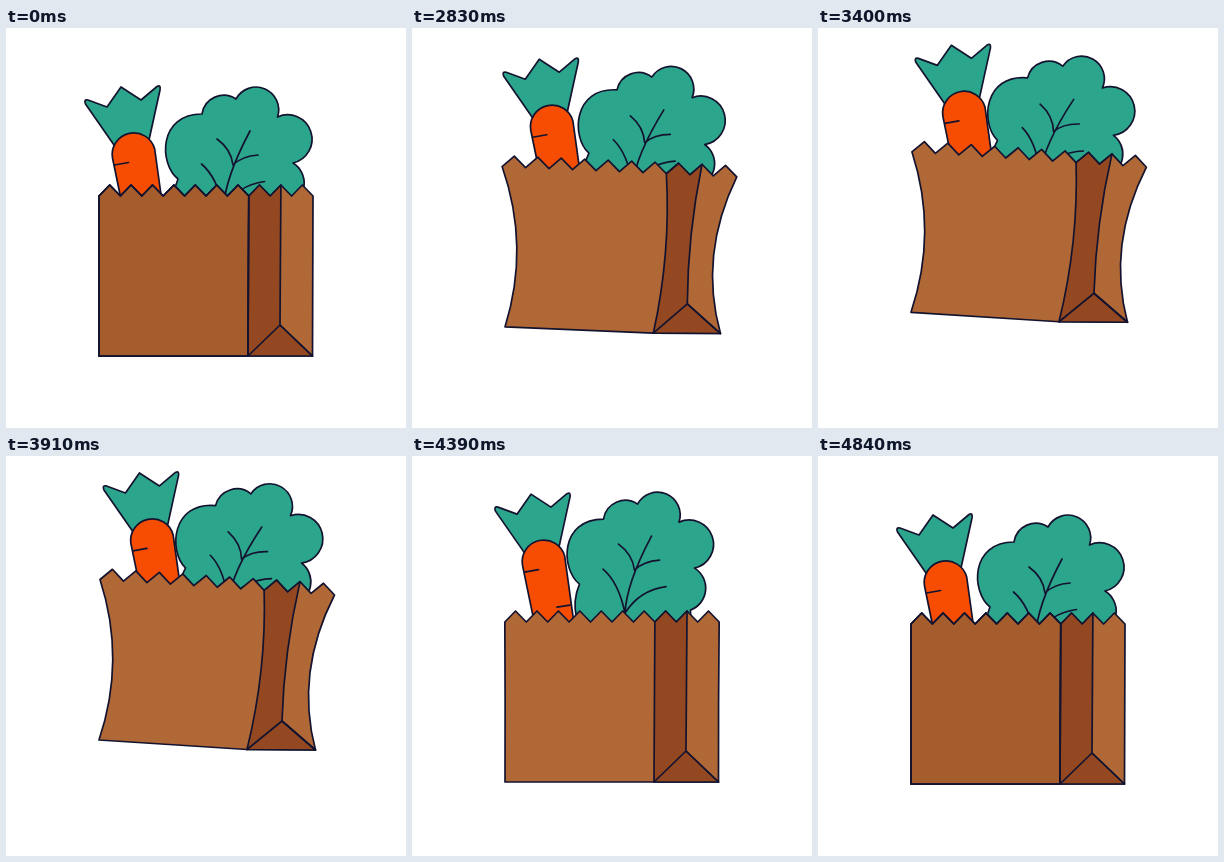
These frames come from a looping animation (400 by 400 pixels, 4.87 s). An HTML page:

```html
<!DOCTYPE html>
<html lang="en">
<head>
<meta charset="utf-8">
<title>Grocery bag</title>
<style>
  html, body { margin: 0; width: 100%; height: 100%; overflow: hidden; background: #fff; }
  svg { display: block; width: 100vw; height: 100vh; }
  .line { fill: none; }
  .leaf { fill: #2ca58d; }
  .root { fill: #f74d02; }
  .dark { fill: #944821; }
</style>
</head>
<body>
<svg viewBox="0 0 400 400" stroke="#13132f" stroke-width="1.7" stroke-linejoin="round" stroke-linecap="round">
  <g id="broccoli">
    <path class="leaf" d="M172 151C153 136 152 86 196 86A22 22 0 0 1 230 71A22.7 22.7 0 0 1 271.5 89A24.4 24.4 0 1 1 287 135A23.5 23.5 0 0 1 283 177V215H172L169 185Q165 167 172 151Z"/>
    <path class="line" d="M217.5 180Q219 150 244 103M211 111Q225 121 227 137Q236 128 252 127M195.5 136Q211 149 217.5 180Q232 157 258.5 153.5"/>
  </g>
  <g id="carrot">
    <path class="leaf" d="M108 117L79.5 76Q77.5 71 82 72L101 79L115 59L135 72L151 58.5Q155 56.500 154 62L143 112Z"/>
    <path class="root" d="M106.5 130A21.6 21.6 0 0 1 148.7 121L161 210H123Z"/>
    <path class="line" d="M108.500 137L122.500 134.500M141 172L154 170"/>
  </g>
  <path id="body"/>
  <path id="side" class="dark"/>
  <path id="folds" class="line"/>
</svg>
<script>
const LOOP = 4870, START = 2530, END = 4840;
const $ = id => document.getElementById(id);
const mix = (a, b, k) => a + (b - a) * k;

// Monotone cubic through [time, value] pairs.
function track(keys) {
  const n = keys.length;
  const slope = i => (keys[i + 1][1] - keys[i][1]) / (keys[i + 1][0] - keys[i][0]);
  const tangent = keys.map((k, i) => {
    if (i === 0 || i === n - 1) return 0;
    const a = slope(i - 1), b = slope(i);
    return a * b > 0 ? 2 * a * b / (a + b) : 0;
  });
  return t => {
    if (t <= keys[0][0]) return keys[0][1];
    if (t >= keys[n - 1][0]) return keys[n - 1][1];
    let i = 0;
    while (t > keys[i + 1][0]) i++;
    const [t0, v0] = keys[i], [t1, v1] = keys[i + 1];
    const d = t1 - t0, x = (t - t0) / d, y = 1 - x;
    return v0 * (1 + 2 * x) * y * y + v1 * x * x * (3 - 2 * x)
      + d * x * y * (tangent[i] * y - tangent[i + 1] * x);
  };
}

const rise = [[2520, 0], [2830, 0.66], [3070, 0.945], [3320, 0.99], [3900, 1]];
const along = (peak, ...rest) => track([...rise.map(([t, v]) => [t, v * peak]), ...rest]);

const lift = along(1, [4110, 1], [4200, 0.7], [4285, 0]);
const bend = track([[2500, 0], [2530, 0.16], [2830, 1], [4060, 1], [4190, 0], [4290, -1.3], [4380, 0], [4450, 0.06], [4600, 0]]);
const hop = track([[4290, 0], [4390, 2], [4640, 0]]);

const carrotX = along(18.5, [4130, 9], [4390, 4], [4520, 0]);
const carrotY = along(-42, [4130, -49], [4390, -21], [4520, 3], [4680, 0]);
const broccoliX = along(10.500, [4130, 4], [4390, -4.5], [4540, 0]);
const broccoliY = along(-33, [4130, -42], [4390, -23], [4520, 3], [4680, 0]);
const broccoliTurn = along(5.5, [4130, 3], [4340, 0]);

const str = p => p[0].toFixed(2) + " " + p[1].toFixed(2);
const poly = pts => pts.map(str).join("L");

// Curve to b whose control point sits sideways of the middle of a-b.
const bow = (a, b, off) => "Q" + str([(a[0] + b[0]) / 2 + off, (a[1] + b[1]) / 2]) + " " + str(b);

function drawBag(u, b, up, resting) {
  const flare = 10.5 * Math.max(b, 0), squash = 7 * Math.max(-b, 0);
  const at = (x, y, dx, dy) => [x + dx * u, y + dy * u - up];
  const tl = at(93 - flare, 168 + squash, 11.5, -44.5);
  const tr = at(307 + flare, 168 + squash, 11, -29);
  const bl = at(93, 328, 0, -44);
  const bm = at(242, 328, -1, -34.5);
  const br = at(306.5, 328, 3, -34);
  const apex = at(274, 297, 2, -32);
  const lean = (tr[1] - tl[1]) / (tr[0] - tl[0]);

  // Even steps are valleys, odd steps are peaks.
  const tooth = i => {
    const h = i % 2 ? 11 : 0;
    return [mix(tl[0], tr[0], i / 20) + h * lean, mix(tl[1], tr[1], i / 20) - h];
  };
  const teeth = (from, to) => Array.from({ length: to - from + 1 }, (_, i) => tooth(from + i));
  const corner = tooth(14), ridge = tooth(17);

  $("body").setAttribute("d", "M" + poly(teeth(0, 20)) + bow(tr, br, -30 * b)
    + "L" + poly([bm, bl]) + bow(bl, tl, 26.5 * b) + "Z");
  $("body").setAttribute("fill", "#b06836");
  $("side").setAttribute("d", "M" + poly(teeth(14, 17)) + bow(ridge, apex, -7 * b)
    + "L" + poly([br, bm]) + bow(bm, corner, 11 * b) + "Z");
  $("folds").setAttribute("d", "M" + poly([bm, apex, br])
    + (resting ? "M" + poly(teeth(0, 14)) + "L" + poly([bm, bl]) + "Z" : ""));
  $("folds").style.fill = "none";
  front.setAttribute("d", resting ? "M" + poly(teeth(0, 14)) + "L" + poly([bm, bl]) + "Z" : "");
}

// Shaded front panel, seen only while the bag stands still.
const front = document.createElementNS("http://www.w3.org/2000/svg", "path");
front.setAttribute("fill", "#a65d2e");
$("side").before(front);

function draw(time) {
  const resting = time < START || time >= END;
  const t = resting ? 0 : time;
  drawBag(lift(t), bend(t), hop(t), resting);
  $("carrot").setAttribute("transform", `translate(${carrotX(t)} ${carrotY(t)})`);
  $("broccoli").setAttribute("transform",
    `translate(${broccoliX(t)} ${broccoliY(t)}) rotate(${broccoliTurn(t)} 233 117)`);
}

const begin = performance.now();
function tick() {
  draw((performance.now() - begin) % LOOP);
  requestAnimationFrame(tick);
}
draw(0);
requestAnimationFrame(tick);
</script>
</body>
</html>
```
